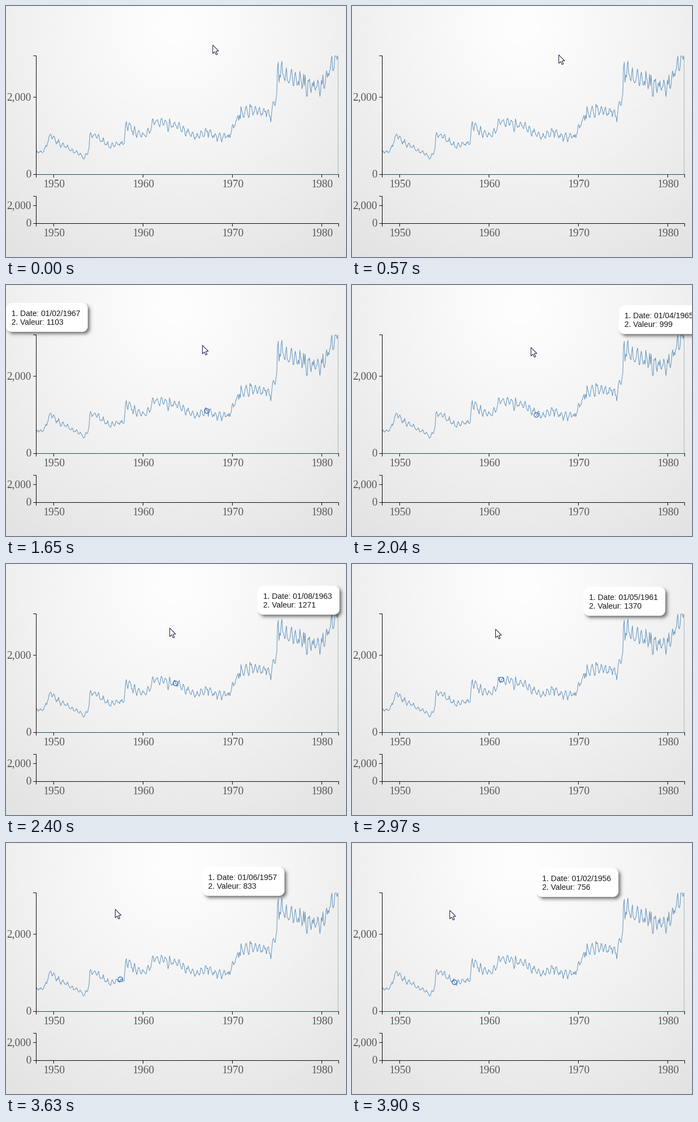
A matplotlib script for the animation above (4590 ms loop, 624 px wide and 461 px high).

```python
import math

import matplotlib.pyplot as plt
import numpy as np
from matplotlib.animation import FuncAnimation
from matplotlib.patches import Circle, Polygon

W, H, DPI = 624, 461, 100
STEP_MS, LOOP_MS = 30, 4590
PX = 72 / DPI  # one pixel in points

LEFT, RIGHT, TOP, BASE = 55.5, 610.5, 91.5, 309.5
MONTHS, MONTH_W, VALUE_H = 406, 16.4 / 12, 0.071
TIP_W, TIP_H, PAD = 150, 52, 16
SWEEP_START, SWEEP_END = 1470, 3900

# mouse keyframes: time (ms), hovered chart x, cursor y
MOUSE = np.array([
    (300, 387, 71), (870, 386, 108), (SWEEP_START, 386, 108),
    (1650, 368.2, 110), (2400, 310.5, 117), (2580, 299, 118),
    (2820, 299, 118), (2970, 273.4, 119), (3360, 231.6, 119),
    (SWEEP_END, 187.3, 123),
])

# turning points of the series: month, value
TURNS = np.array([
    (0, 570), (10, 600), (20, 1030), (28, 850), (65, 430), (71, 700),
    (72, 1030), (80, 1000), (97, 756), (118, 800), (120, 1290), (126, 1300),
    (129, 1133), (142, 1020), (153, 1100), (157, 1430), (160, 1370),
    (187, 1271), (215, 970), (229, 1103), (242, 988), (258, 960),
    (273, 1540), (290, 1660), (316, 1550), (323, 2080), (324, 2750),
    (331, 2600), (372, 2270), (384, 2330), (392, 2620), (405, 3065),
])


def make_series():
    """Straight runs between turns, with a half-yearly season and noise."""
    month = np.arange(MONTHS)
    season = 0.075 * np.cos(2 * np.pi * month / 6)
    noise = np.random.default_rng(12).normal(0, 0.035, MONTHS)
    values = np.interp(month, *TURNS.T) * (1 + season + noise)
    values[TURNS[:, 0]] = TURNS[:, 1]
    values = np.minimum(values, TURNS[-1, 1])
    return LEFT + MONTH_W * month, np.rint(values).astype(int)


def make_background():
    y, x = np.mgrid[0:H, 0:W]
    r = np.hypot(x - 310, y - 40) / 560
    grain = np.random.default_rng(3).normal(0, 0.9, (H, W))
    grey = 254 - 30 * r ** 1.2 + grain * np.clip(r * 2, 0, 1)
    return np.repeat(np.clip(grey, 0, 255)[..., None] / 255, 3, axis=2)


def rounded_distance(x, y, radius):
    """Signed distance to the edge of the tooltip box."""
    dx = np.abs(x - TIP_W / 2) - TIP_W / 2 + radius
    dy = np.abs(y - TIP_H / 2) - TIP_H / 2 + radius
    outside = np.hypot(np.maximum(dx, 0), np.maximum(dy, 0))
    return outside + np.minimum(np.maximum(dx, dy), 0) - radius


def make_tooltip():
    """White rounded card on a soft shadow, as an RGBA picture."""
    y, x = np.mgrid[0:TIP_H + PAD, 0:TIP_W + PAD] + 0.5
    card = np.clip(0.5 - rounded_distance(x, y, 10), 0, 1)
    shadow = 0.5 / (1 + np.exp(rounded_distance(x - 4, y - 4, 11) / 1.8))
    alpha = card + shadow * (1 - card)
    rgba = np.zeros(x.shape + (4,))
    rgba[..., :3] = (card / np.maximum(alpha, 1e-6))[..., None]
    rgba[..., 3] = alpha
    return rgba


fig = plt.figure(figsize=(W / DPI, H / DPI), dpi=DPI)
ax = fig.add_axes([0, 0, 1, 1])
ax.axis("off")


def picture(rgb, extent, z):
    return ax.imshow(rgb, extent=extent, aspect="auto",
                     interpolation="nearest", zorder=z)


def line(xs, ys, color="black", z=3, **style):
    # coordinates already sit on pixel centres, so snapping would shift them
    ax.plot(xs, ys, color=color, lw=PX, zorder=z, snap=False,
            solid_joinstyle="miter", solid_capstyle="butt", **style)


def label(x, y, text, size=20, family="Liberation Serif", color="#585858",
          ha="center", z=3):
    return ax.text(x, y, text, fontsize=size * PX, family=family, color=color,
                   ha=ha, va="baseline", zorder=z)


def draw_axes(top, base, two_thousand):
    line([LEFT - 5.5, LEFT, LEFT, LEFT - 5.5], [top, top, base, base])
    line([LEFT - 5.5, LEFT], [two_thousand] * 2)
    line([LEFT, LEFT, RIGHT, RIGHT],
         [base + 5.5, base, base, base + 5.5])
    for year in range(1950, 1981, 10):
        x = 87.5 + 16.4 * (year - 1950)
        line([x, x], [base, base + 5.5])
        label(x + 0.4, base + 23.5, str(year))
    label(46, base + 5.5, "0", ha="right")
    label(46, two_thousand + 6.5, "2,000", ha="right")


picture(make_background(), (0, W, H, 0), 0)
months_x, series = make_series()
draw_axes(TOP, BASE, 167.5)
draw_axes(349.5, 399.5, 366.5)
line(months_x, BASE - series * VALUE_H, "steelblue", z=2, alpha=0.85)
line([RIGHT - 1] * 2, [TOP, BASE], "#a5b3b8", z=2)
line([LEFT + 0.5, RIGHT - 1], [BASE] * 2, "#0d464e", z=4)

marker = ax.add_patch(Circle((0, 0), 4.3, fill=False, ec="#1c50b4",
                             lw=1.1 * PX, zorder=5))
card = picture(make_tooltip(), (0, 1, 1, 0), 6)
tip_lines = [label(0, 0, "", 14.4, "Liberation Sans", "#181818", "left", 7)
             for _ in range(2)]
ARROW = np.array([(0.5, 0.7), (0.5, 16.4), (4, 13), (6.6, 18.5), (9, 17.5),
                  (6.5, 12), (11.3, 11.7)])
cursor = ax.add_patch(Polygon(ARROW, fc="white", ec="#10103a", lw=PX,
                              joinstyle="miter", zorder=8))


def fix_view():
    ax.set_xlim(0, W)
    ax.set_ylim(H, 0)


def mouse_at(time):
    """Hovered chart x and the cursor's place; hovering trails in a sweep."""
    hover, y = (np.interp(time, MOUSE[:, 0], track) for track in MOUSE.T[1:])
    sweep = np.clip((time - SWEEP_START) / (SWEEP_END - SWEEP_START), 0, 1)
    trail = 8 + 2.8 * math.sin(math.pi * sweep)
    return hover, round(hover - trail), round(y)


def update(frame):
    hover, cx, cy = mouse_at(frame * STEP_MS)
    cursor.set_xy(ARROW + (cx, cy))

    inside = cy >= 99
    for artist in (marker, card, *tip_lines):
        artist.set_visible(inside)
    if inside:
        month = math.ceil((hover - LEFT - 0.2) / MONTH_W)
        value = series[month]
        marker.center = months_x[month], BASE - value * VALUE_H

        # the card jumps to the right when it would leave the stage
        x = round(hover) - 368
        if x < 0:
            x += 520
        y = cy - 76
        card.set_extent((x, x + TIP_W + PAD, y + TIP_H + PAD, y))
        date = f"01/{month % 12 + 1:02d}/{1948 + month // 12}"
        texts = f"1. Date: {date}", f"2. Valeur: {value}"
        for i, (item, text) in enumerate(zip(tip_lines, texts)):
            item.set_text(text)
            item.set_position((x + 10, y + 23 + 16 * i))
    fix_view()
    return marker, card, cursor, *tip_lines


anim = FuncAnimation(fig, update, frames=LOOP_MS // STEP_MS,
                     interval=STEP_MS, repeat=True, repeat_delay=0)
plt.show()
```
